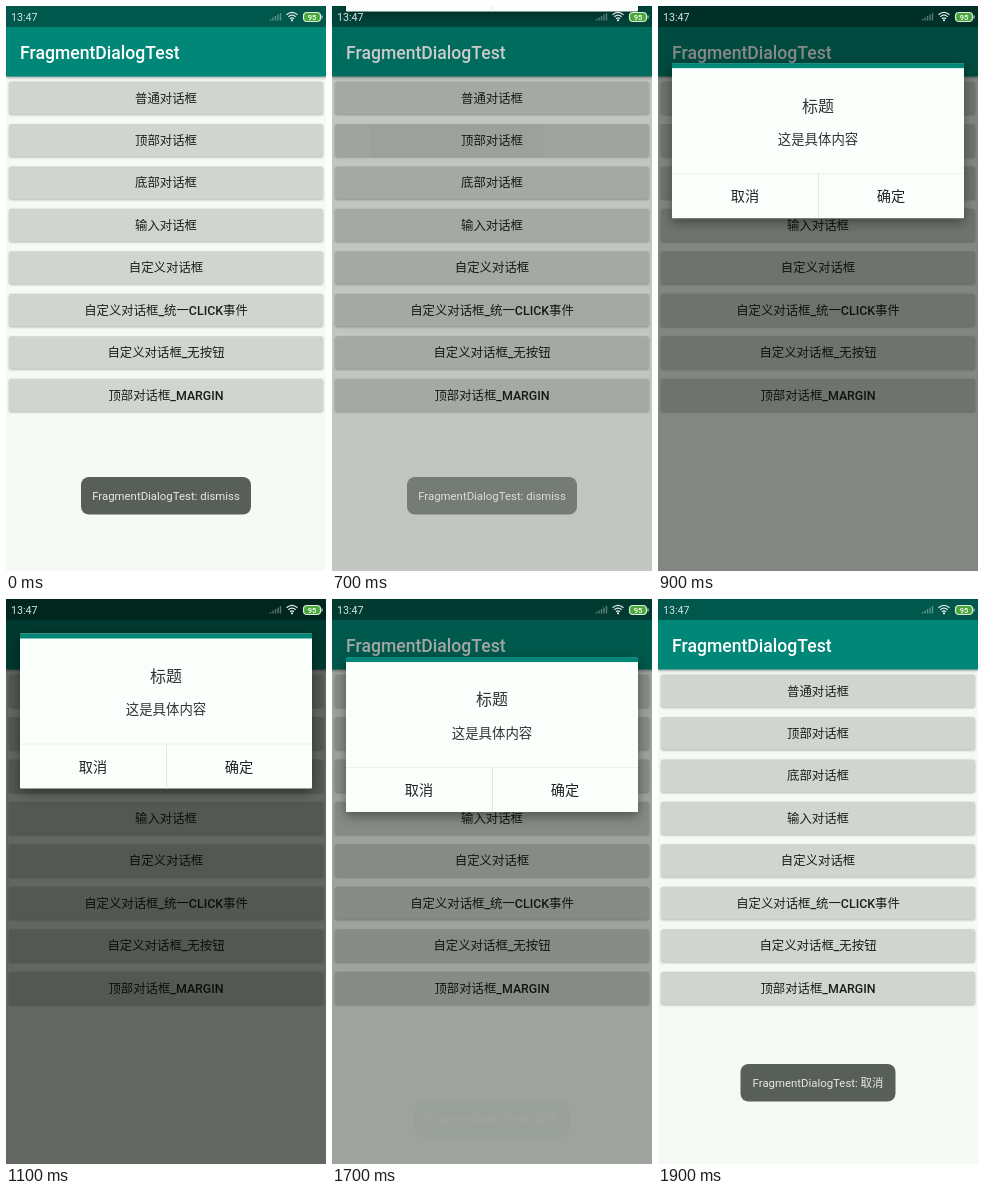
Recreate the animation shown at these times as an HTML page. Size 320 px wide and 565 px high, loop 2 s.

```html
<!DOCTYPE html>
<html lang="zh-CN">
<head>
<meta charset="utf-8">
<title>FragmentDialogTest</title>
<style>
  html, body { margin: 0; width: 100%; height: 100%; overflow: hidden; background: #f5faf5; }
  svg { display: block; width: 320px; height: 565px; font-family: Roboto, "Noto Sans CJK SC", "Noto Sans CJK", sans-serif; }
  .bar { filter: drop-shadow(0 1px 1.5px rgba(0, 0, 0, .4)); }
  .button { fill: #d0d5cf; filter: drop-shadow(0 1px 1px rgba(0, 0, 0, .27)); }
  .card { filter: drop-shadow(0 4px 6px rgba(0, 0, 0, .4)); }
</style>
</head>
<body>
<svg viewBox="0 0 320 565">
  <clipPath id="pressArea"><rect x="3" y="118" width="314" height="33" rx="2"/></clipPath>
  <rect width="320" height="565" fill="#f5faf5"/>
  <g id="page">
    <rect class="bar" y="21" width="320" height="49.5" fill="#008777"/>
    <rect width="320" height="21" fill="#00574b"/>
    <g id="buttons"></g>
    <g id="press" clip-path="url(#pressArea)">
      <rect x="3" y="118" width="314" height="33" opacity=".045"/>
      <circle id="ripple" cx="125" cy="134.5" opacity=".03"/>
    </g>
    <g id="labels"></g>
  </g>
  <rect id="dim" width="320" height="565" fill="#000600"/>
  <g id="dialog">
    <rect class="card" x="14" width="292" height="155" rx="1" fill="#fbfffb"/>
    <rect x="14" width="292" height="5" fill="#008777"/>
    <path d="M14 110.5H306" stroke="#eef2ed"/>
    <path d="M160.5 110.5V155" stroke="#e3e7e2"/>
  </g>
  <g id="status">
    <path d="M264.5 14.5v-1.5M267 14.5v-3M269.5 14.5v-4.5M272 14.5v-6M274.5 14.5v-7.5" stroke="#fff" stroke-width="1.4" opacity=".35"/>
    <g fill="none" stroke="#e4eeea" stroke-width="1.2">
      <path d="M280.5 8.8Q286 4 291.5 8.8M282.3 10.8Q286 7.6 289.7 10.8M284 12.8Q286 11 288 12.8"/>
      <circle cx="286" cy="14.3" r=".5"/>
    </g>
    <rect x="297.5" y="6.5" width="17" height="9" rx="3.5" fill="#49a83a" stroke="#dcebdc" stroke-width="1.2"/>
    <path d="M316 9.5v3" stroke="#dcebdc"/>
  </g>
  <g id="oldToast"></g>
  <g id="newToast"></g>
</svg>
<script>
const SVG_NS = 'http://www.w3.org/2000/svg';
const LOOP = 2000, STEP = 100, REST_Y = 34.5, HIDDEN_Y = -149.5;
const byId = id => document.getElementById(id);
const clamp = v => Math.max(0, Math.min(1, v));
const progress = (t, start, length) => clamp((t - start) / length);

function add(parent, tag, attributes) {
  const node = document.createElementNS(SVG_NS, tag);
  for (const key in attributes) node.setAttribute(key, attributes[key]);
  return byId(parent).appendChild(node);
}

// y is the visual centre of the line
function label(parent, text, x, y, size, fill, weight = 400, anchor = 'middle') {
  add(parent, 'text', {
    x, y: y + size * .37, fill, 'font-size': size,
    'font-weight': weight, 'text-anchor': anchor
  }).textContent = text;
}

function toast(id, text, width) {
  add(id, 'rect', { x: 160 - width / 2, width, height: 37.5, rx: 8, fill: '#585f58' });
  label(id, text, 160, 19, 11.4, '#e4e8e4');
}

['普通对话框', '顶部对话框', '底部对话框', '输入对话框', '自定义对话框',
 '自定义对话框_统一CLICK事件', '自定义对话框_无按钮', '顶部对话框_MARGIN'].forEach((text, i) => {
  const center = 92 + i * 42.45;
  add('buttons', 'rect', { class: 'button', x: 3, y: center - 16.5, width: 314, height: 32.5, rx: 2 });
  label('labels', text, 160, center, 12.4, '#1c1e1c', 500);
});
label('labels', 'FragmentDialogTest', 14, 46, 17.6, '#fff', 500, 'start');
label('dialog', '标题', 160, 42.5, 16, '#333');
label('dialog', '这是具体内容', 160, 75.5, 13.4, '#333');
label('dialog', '取消', 87, 133, 14.2, '#222');
label('dialog', '确定', 233, 133, 14.2, '#222');
label('status', '13:47', 5, 11, 10.7, '#d5e4e0', 400, 'start');
label('status', '95', 306, 11, 7.5, '#fff', 500);
toast('oldToast', 'FragmentDialogTest: dismiss', 170);
toast('newToast', 'FragmentDialogTest: 取消', 155);

const overshoot = p => (p - 1) ** 2 * (3 * (p - 1) + 2) + 1;
const anticipate = p => p * p * (3 * p - 2);

function dialogY(t) {
  const shown = overshoot(progress(t, 700, 320)) - anticipate(progress(t, 1580, 300));
  return HIDDEN_Y + (REST_Y - HIDDEN_Y) * shown;
}

function dimming(t) {
  if (t < 700) return 0;
  return t < 1600 ? Math.min(.6, .21 + (t - 700) * .0013) : .6 * (1 - progress(t, 1600, 245));
}

function place(id, y, opacity) {
  byId(id).setAttribute('transform', `translate(0 ${y})`);
  byId(id).setAttribute('opacity', opacity);
}

function draw(now) {
  const t = Math.floor(now % LOOP / STEP) * STEP;
  byId('ripple').setAttribute('r', t * t / 5600);
  byId('press').setAttribute('opacity', progress(t, 0, 300) * (1 - progress(t, 630, 220)));
  byId('dim').setAttribute('opacity', dimming(t));
  place('dialog', dialogY(t), t >= 600 && t < 1900 ? 1 : 0);
  place('oldToast', 471, 1 - progress(t, 650, 180));
  place('newToast', 465 + (1900 - t) * .18, clamp(1 - (1900 - t) * .0048));
  requestAnimationFrame(() => draw(performance.now() - start));
}

const start = performance.now();
draw(0);
</script>
</body>
</html>
```
